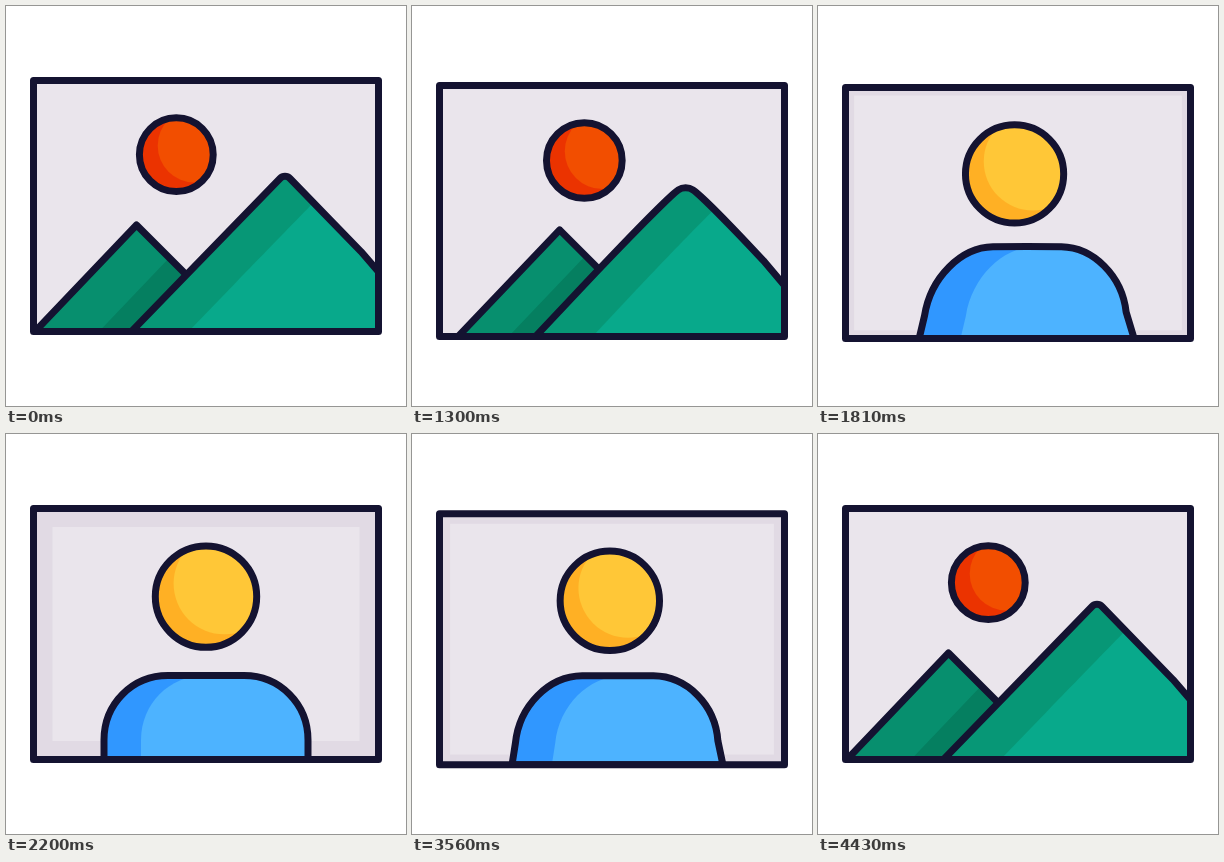
Animation, 400 px wide and 400 px high, one loop 4460 ms. Source, as an HTML page:

```html
<!DOCTYPE html>
<html lang="en">
<head>
<meta charset="utf-8">
<title>Landscape and portrait</title>
<style>
  html, body { margin: 0; width: 100%; height: 100%; overflow: hidden; background: #fff; }
  svg { display: block; width: 100vw; height: 100vh; }
  .line { fill: none; stroke: #141331; stroke-width: 7; stroke-linejoin: round; }
</style>
</head>
<body>
<svg viewBox="0 0 400 400">
  <defs>
    <path id="frame" d="M27.5 74.5H372.5V325.5H27.5Z"/>
    <path id="hill" d="M29 325.5L130.5 219L237 325.5Z"/>
    <clipPath id="inside"><use href="#frame"/></clipPath>
    <clipPath id="hillClip"><use href="#hill"/></clipPath>
    <clipPath id="sunClip"><circle class="sun"/></clipPath>
    <clipPath id="figureClip"><path class="figure"/></clipPath>
  </defs>
  <g id="scene">
    <use href="#frame" fill="#e1dae4"/>
    <rect id="wall" fill="#eae5ec"/>
    <g clip-path="url(#inside)">
      <g id="backHill">
        <use href="#hill" fill="#078f6e"/>
        <g clip-path="url(#hillClip)"><use href="#hill" id="hillDark" fill="#057f60"/></g>
        <use href="#hill" class="line"/>
      </g>
      <circle class="sun" id="sunShade"/>
      <g clip-path="url(#sunClip)"><circle class="sun" id="sunLight"/></g>
      <circle class="sun line"/>
      <path class="figure" id="figureShade"/>
      <g clip-path="url(#figureClip)"><path class="figure" id="figureLight"/></g>
      <path class="figure line"/>
    </g>
    <use href="#frame" class="line"/>
  </g>
</svg>
<script>
const LOOP = 4460, FLOOR = 325.5;
const $ = id => document.getElementById(id);
const suns = document.querySelectorAll('.sun');
const figures = document.querySelectorAll('.figure');

const clamp = v => Math.min(1, Math.max(0, v));
const mix = (a, b, k) => a + (b - a) * k;
const mixPoint = (a, b, k) => a.map((v, i) => mix(v, b[i], k));
const ease = v => v < .5 ? 4 * v ** 3 : 1 - 4 * (1 - v) ** 3;
const smooth = (from, to, v) => {
  const u = clamp((v - from) / (to - from));
  return u * u * (3 - 2 * u);
};
const blend = (a, b, k) => `rgb(${mixPoint(a, b, k).map(Math.round)})`;
const set = (el, attrs) => {
  for (const name in attrs) el.setAttribute(name, attrs[name]);
};

// Both outlines run: base, shoulder, corner, top, apex, top, corner, shoulder, base.
const onSlope = d => [279 + d, 167.3 + 1.03 * Math.abs(d)];
const mountain = [
  [125.5, FLOOR], ...[-107, -14, -5, 0, 5, 14, 76].map(onSlope), [424, FLOOR]
];
const bust = mountain.map((_, i) => {
  const side = Math.sign(i - 4), steps = Math.abs(i - 4);
  const x = 200 + side * [0, 38, 102, 102, 102][steps];
  return [x, steps === 4 ? FLOOR : steps === 3 ? 306 : 241.5];
});

// Round the corner between two points with a circle-like curve.
const arc = (from, corner, to) =>
  `C${mixPoint(from, corner, .56)} ${mixPoint(to, corner, .56)} ${to}`;

function figurePath(p) {
  const sag = 30 * p * (1 - p) ** 2;
  const pts = mountain.map((point, i) => {
    const [x, y] = mixPoint(point, bust[i], p);
    return [x, Math.abs(i - 4) < 3 ? y + sag : y];
  });
  const arcs = [1, 3, 5].map(i => arc(...pts.slice(i, i + 3)));
  return `M${pts[0]}L${pts[1]}${arcs.join('')}L${pts[8]}Z`;
}

function draw(time) {
  const t = time % LOOP;
  const x = t < 2700 ? clamp((t - 1000) / 1170) : 1 - clamp((t - 3250) / 1180);
  const p = ease(x);

  set($('scene'), { transform: `translate(0 ${9 * ease(1 - Math.abs(2 * x - 1))})` });

  const inset = 31 + 15.5 * smooth(.5, 1, x);
  set($('wall'), { x: inset, y: inset + 46.5, width: 400 - 2 * inset, height: 307 - 2 * inset });

  set($('backHill'), {
    transform: `translate(${252 * p} 0)`,
    visibility: p < .42 ? 'visible' : 'hidden'
  });
  set($('hillDark'), { x: 64 - 200 * p });

  const sun = { cx: mix(170.3, 200, p), cy: mix(148.7, 162.6, p), r: mix(36.9, 50.7, p) };
  suns.forEach(el => set(el, sun));
  const warm = smooth(.33, .48, x);
  set($('sunShade'), { fill: blend([235, 51, 0], [255, 176, 36], warm) });
  set($('sunLight'), {
    fill: blend([242, 78, 0], [255, 199, 55], warm),
    transform: `translate(18.3 ${mix(-9, -13, p)})`
  });

  const d = figurePath(p);
  figures.forEach(el => set(el, { d }));
  const blue = smooth(.48, .66, x);
  set($('figureShade'), { fill: blend([7, 151, 118], [48, 151, 255], blue) });
  set($('figureLight'), {
    fill: blend([8, 169, 139], [77, 179, 255], blue),
    transform: `translate(${mix(57, 37, p * p)} 0)`
  });
}

const start = performance.now();
function tick() {
  draw(performance.now() - start);
  requestAnimationFrame(tick);
}
tick();
</script>
</body>
</html>
```
